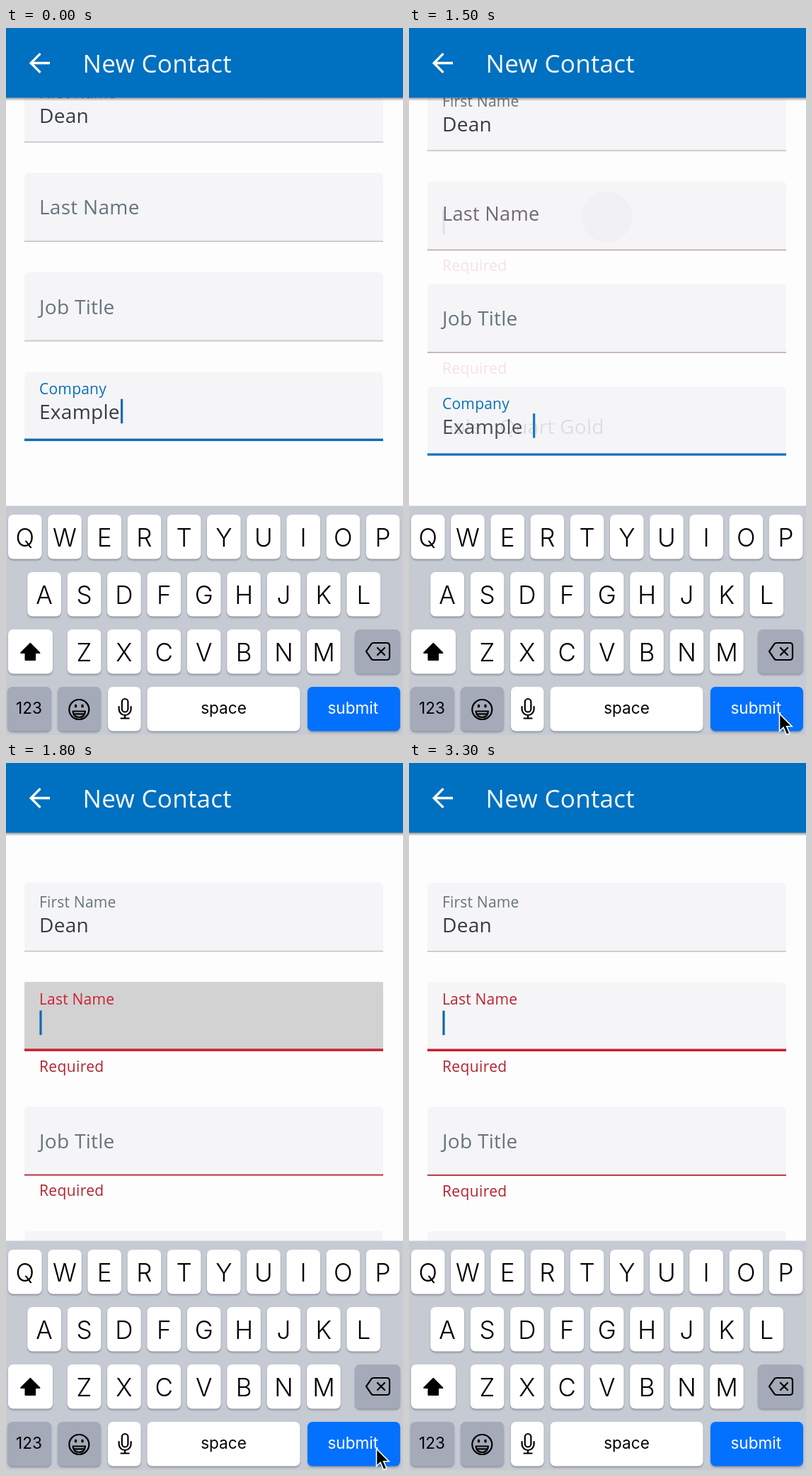
Write an HTML page that moves like this. It is 561 px wide and 998 px high and loops after 3.4 s.

```html
<!DOCTYPE html>
<html lang="en">
<head>
<meta charset="utf-8">
<title>New Contact</title>
<style>
html, body { margin: 0; width: 100%; height: 100%; overflow: hidden; background: #fefdfe; }
svg { display: block; width: 561px; height: 998px; }
text { font-family: "Open Sans", "Noto Sans", sans-serif; white-space: pre; }
.field { font-size: 28.05px; letter-spacing: .0094em; }
.help { font-size: 21.04px; letter-spacing: .35px; fill: #b4222d; }
.key { font-family: Inter, Roboto, sans-serif; font-size: 35px; font-weight: 300; text-anchor: middle; }
.word { font-size: 22.6px; font-weight: 400; }
.icon { fill: none; stroke: #000; stroke-width: 2.2; stroke-linecap: round; stroke-linejoin: round; }
</style>
</head>
<body>
<svg viewBox="0 0 561 998">
  <defs>
    <clipPath id="fieldClip"><rect x="26" width="507" height="97.5"/></clipPath>
    <linearGradient id="fade" x2="0" y2="1">
      <stop stop-color="#000" stop-opacity=".42"/>
      <stop offset="1" stop-color="#000" stop-opacity="0"/>
    </linearGradient>
    <filter id="soft" x="-20%" y="-20%" width="140%" height="140%"><feGaussianBlur stdDeviation="1.2"/></filter>
  </defs>
  <rect width="561" height="998" fill="#fefdfe"/>
  <g id="form"></g>
  <g id="bar">
    <rect y="98" width="561" height="5" fill="url(#fade)"/>
    <rect width="561" height="98.3" fill="#0070c1"/>
    <path d="M62 49.5H36M48.5 36.2L35.2 49.5L48.5 62.8" fill="none" stroke="#fff" stroke-width="3.3"/>
    <text x="108.6" y="63" font-size="35.06" letter-spacing=".0075em" fill="#f6fbff">New Contact</text>
  </g>
  <g id="keyboard"><rect y="674.5" width="561" height="324" fill="#c5cad3"/></g>
  <g id="pointer">
    <path id="arrow" d="M0 0V24.5L5.6 19.4L10 29.6L14.4 27.7L10.1 17.7H17.6Z" fill="#000" stroke="#fff" stroke-width="1.6"/>
    <g id="hand" fill="#fff" stroke="#000" stroke-width="1.7" stroke-linejoin="round">
      <path d="M-3.4 7.5C-4.8 4 .5 2.8 1.8 6L5 14C5 11.4 8.6 11 9.5 13.4C10.2 11.6 13.2 11.7 13.8 14C15 12.7 17.2 13.5 17.4 15.5C18.1 19.5 18 23 16 26.5V30H4.2C2.5 26.5-1.2 23.5-4.2 20.2C-6.4 17.2-3.4 15.6-.9 17.4L1.2 19Z"/>
      <path d="M6.3 20V26M9.8 20V26M13.3 20V26" fill="none" stroke-width="1.3"/>
    </g>
  </g>
</svg>
<script>
const LOOP = 3400, STEP = 100;
const $ = id => document.getElementById(id);
const GREY = "#67747d", INK = "#353d44", BLUE = "#0f6cb6", RED = "#c9202e", RULE = "#c6c7cb";

function add(parent, tag, attrs, content) {
  const el = document.createElementNS("http://www.w3.org/2000/svg", tag);
  set(el, attrs);
  if (content) el.textContent = content;
  return parent.appendChild(el);
}
function set(el, attrs) {
  for (const name in attrs) el.setAttribute(name, attrs[name]);
}
const lerp = (a, b, p) => a + (b - a) * p;
const clamp = v => Math.min(1, Math.max(0, v));
const ease = (t, start, length) => .5 - .5 * Math.cos(Math.PI * clamp((t - start) / length));
function mix(a, b, p) {
  const channel = (hex, i) => parseInt(hex.slice(i, i + 2), 16);
  return `rgb(${[1, 3, 5].map(i => Math.round(lerp(channel(a, i), channel(b, i), p)))})`;
}

// Form fields
function makeField(label) {
  const g = add($("form"), "g", {});
  add(g, "path", { d: "M26 97.5V7Q26 0 33 0H526Q533 0 533 7V97.5Z", fill: "#f5f5f7" });
  const ripple = add(g, "circle", { cx: 279.7, cy: 50, r: 0, "clip-path": "url(#fieldClip)" });
  const line = add(g, "rect", { x: 26, width: 507 });
  const name = add(g, "text", { x: 47, class: "field" }, label);
  return { g, ripple, line, name };
}
const value = (field, content) => add(field.g, "text", { x: 47, class: "field", fill: INK }, content);
const helper = field => add(field.g, "text", { x: 47, y: 126.5, class: "help" }, "Required");
const caret = field => add(field.g, "rect", { width: 3.2, height: 34.5 });

const [first, last, job, company] = ["First Name", "Last Name", "Job Title", "Company"].map(makeField);
const oldValue = value(company, "Example"), newValue = value(company, "Solen Quart Gold");
const companyCaret = caret(company), lastCaret = caret(last);
const helpers = [helper(last), helper(job)];
value(first, "Dean").setAttribute("y", 70);

const place = (field, y) => set(field.g, { transform: `translate(0 ${y})` });
const rule = (field, weight, fill) => set(field.line, { y: 97.7 - weight, height: weight, fill });
function tag(field, y, size, fill) {
  set(field.name, { y, fill });
  field.name.style.fontSize = size + "px";
}
tag(first, 35, 21.04, GREY);
rule(first, 1.7, RULE);
tag(job, 59, 28.05, GREY);

// Keyboard
const board = $("keyboard");
function key(x, y, width, fill = "#fff") {
  const box = { x, width, height: 62.5, rx: 7 };
  add(board, "rect", { ...box, y: y + 2, fill: "#7f848f", opacity: .75, filter: "url(#soft)" });
  add(board, "rect", { ...box, y, fill });
}
const keyText = (x, y, content, cls = "key", fill = "#000") => add(board, "text", { x, y, class: cls, fill }, content);
const icon = (d, attrs = {}) => add(board, "path", { d, class: "icon", ...attrs });

[["QWERTYUIOP", 56.2], ["ASDFGHJKL", 56.4], ["ZXCVBNM", 56.4]].forEach(([letters, pitch], row) => {
  [...letters].forEach((letter, i) => {
    const x = 279.7 + (i - (letters.length - 1) / 2) * pitch;
    key(x - 23.8, 687 + 81 * row, 47.6);
    keyText(x, 732 + 81 * row, letter);
  });
});
const DARK = "#a4aab8";
key(3, 849, 63);
key(493, 849, 64, DARK);
key(2, 930, 62, DARK);
key(73, 930, 61, DARK);
key(144, 930, 46.5);
key(199.5, 930, 216);
key(426, 930, 131, "#0371fe");
keyText(32.5, 968, "123", "key word");
keyText(307.5, 968, "space", "key word");
keyText(490.3, 968, "submit", "key word", "#fff");
icon("M34.3 869L47.3 882H41V892H27.6V882H21.3Z", { style: "fill:#000" });
icon("M519 868H538Q542 868 542 872V888Q542 892 538 892H519Q517.5 892 516.5 890.8L509 880L516.5 869.2Q517.5 868 519 868ZM525 875L535 885M535 875L525 885");
add(board, "circle", { cx: 103.3, cy: 962, r: 14, class: "icon" });
icon("M94.5 964.5H112Q111 973 103.3 973T94.5 964.5ZM97 968.3H109.5", { "stroke-width": 1.7 });
for (const cx of [98.5, 108]) add(board, "ellipse", { cx, cy: 957, rx: 1.8, ry: 2.6 });
add(board, "rect", { x: 163.8, y: 947, width: 8.6, height: 18.5, rx: 4.3, class: "icon" });
icon("M159.6 958V961.5A8.5 8.5 0 0 0 176.6 961.5V958M168.1 970V974.5M162.5 974.5H173.7");

function render(t) {
  const p = ease(t, 1411, 400);
  const fade = ease(t, 1850, 400);
  const scroll = 105 * p, push = 35.2 * p;

  place(first, 64 + scroll);
  place(last, 204.3 + scroll);
  place(job, 344.8 + scroll + push);
  place(company, 485.4 + scroll + 2 * push);

  tag(last, lerp(59, 31.5, p), lerp(28.05, 21.04, p), p < 1 ? mix(GREY, "#cf202f", p) : mix("#cf202f", "#bb2430", fade));
  rule(last, lerp(1.7, 3.5, p), mix(RULE, RED, p));
  set(last.ripple, { r: 305 * p, opacity: .145 * p * (1 - fade) });
  set(lastCaret, { x: 47.4, y: 40.3, fill: "#1068ac", opacity: p });

  rule(job, 1.8, mix(RULE, "#b9202e", p));
  helpers.forEach(el => set(el, { opacity: p }));

  const drop = 3.5 * p;
  tag(company, 31.5 + drop, 21.04, "#0a6fb8");
  rule(company, lerp(3.5, 1.8, p), mix(BLUE, "#33b4fa", p));
  set(oldValue, { y: 66.5 + drop, opacity: 1 - p });
  set(newValue, { y: 66.5 + drop, opacity: p });
  set(companyCaret, { x: lerp(162, 273.5, p), y: 38.3 - .8 * p, fill: mix(BLUE, "#45dcff", p) });

  const away = 1 - ease(t, 750, 300) + ease(t, 1950, 300);
  set($("pointer"), {
    transform: `translate(${523.5 + 50 * away} ${968 + 35 * away})`,
    visibility: away < 1 ? "visible" : "hidden"
  });
  const clicked = t >= 1400;
  $("arrow").style.display = clicked ? "" : "none";
  $("hand").style.display = clicked ? "none" : "";
}

const start = performance.now();
function tick() {
  const t = (performance.now() - start) % LOOP;
  render(Math.floor(t / STEP) * STEP);
  requestAnimationFrame(tick);
}
tick();
</script>
</body>
</html>
```
